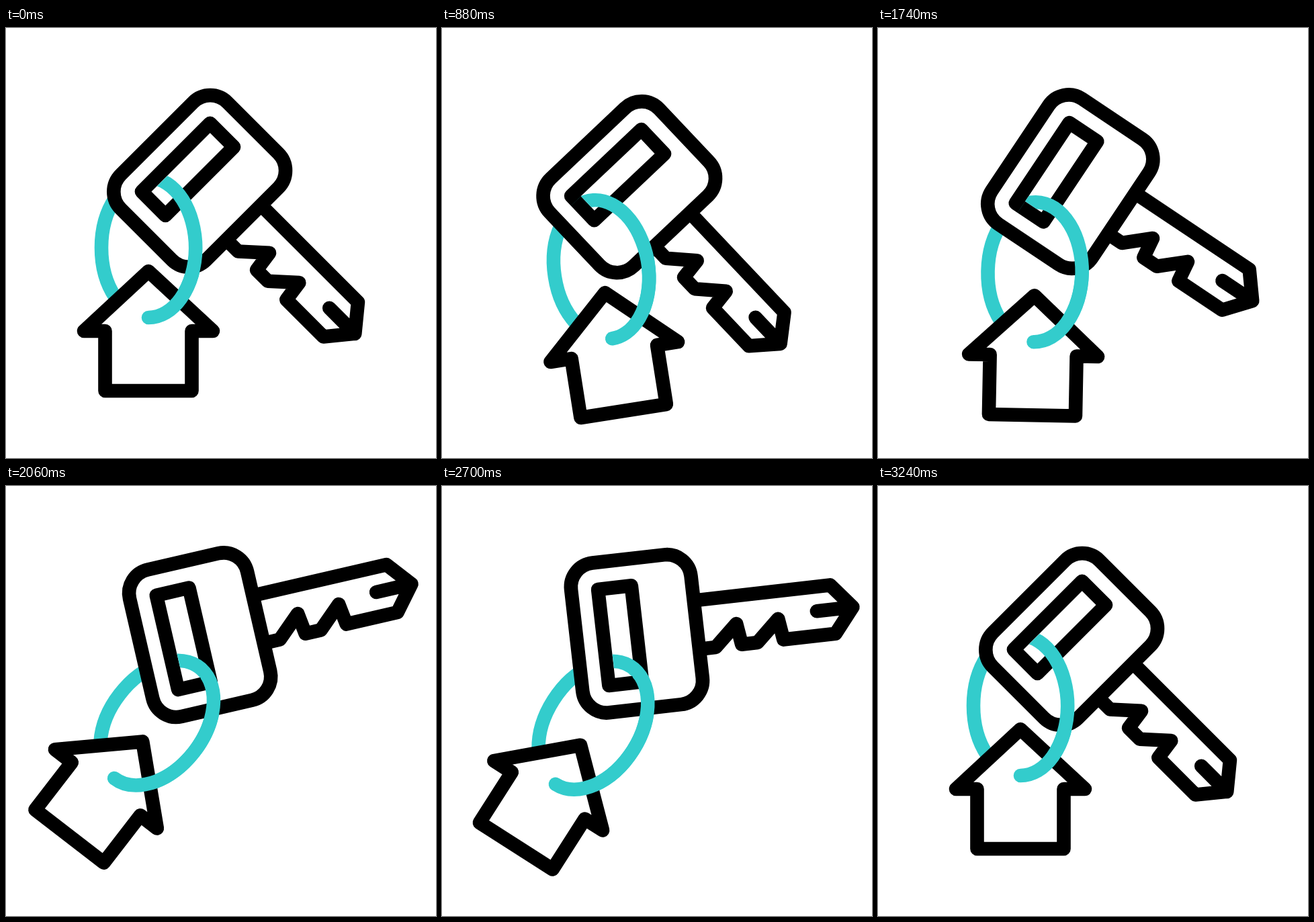
An HTML page with a canvas for the animation above (3.6 s loop, 640 by 640 pixels).

```html
<!DOCTYPE html>
<html lang="en">
<head>
<meta charset="utf-8">
<title>House key</title>
<style>
html, body { margin: 0; width: 100%; height: 100%; overflow: hidden; background: #fff; }
canvas { display: block; width: 640px; height: 640px; }
</style>
</head>
<body>
<canvas id="stage" width="640" height="640"></canvas>
<script>
const ctx = document.getElementById('stage').getContext('2d');
const LOOP = 3600, BEAT = 400, SWING_END = 7 * BEAT, REST_AT = 3240;
const TEAL = '#33cccc';

// Pivot x, pivot y and angle in degrees of the key and of the house tag
const REST = { key: [211.1, 255.6, 45], tag: [212, 232, 0] };
const UP = { key: [276.5, 304.6, -17.5], tag: [287.3, 278.4, 41.2] };
const DOWN = { key: [192, 257.2, 54.2], tag: [214.6, 264.2, -14.9] };

const ease = p => p * p * (3 - 2 * p);

function blend(a, b, p) {
  const mix = part => a[part].map((v, i) => v + (b[part][i] - v) * ease(p));
  return { key: mix('key'), tag: mix('tag') };
}

function poseAt(t) {
  if (t < BEAT) return blend(REST, UP, t / BEAT);
  if (t > SWING_END) return blend(UP, REST, Math.min(1, (t - SWING_END) / (REST_AT - SWING_END)));
  // The first fall starts after a short pause; then one swing per beat
  if (t < 800) return blend(UP, DOWN, Math.max(0, (t - 500) / 300));
  return blend(UP, DOWN, Math.abs(t / BEAT % 2 - 1));
}

function place([x, y, deg], ox, oy) {
  ctx.setTransform(1, 0, 0, 1, x, y);
  ctx.rotate(deg * Math.PI / 180);
  ctx.translate(ox, oy);
}

function shape(build) {
  ctx.beginPath();
  build();
  ctx.fill();
  ctx.stroke();
}

function shaft() {
  const mid = -3, half = 36.4, tip = 323.8, shoulder = 294, low = mid + half;
  ctx.moveTo(80, low);
  for (const x of [114.4, 177]) {
    ctx.lineTo(x, low);
    ctx.lineTo(x + 34.5, 2);
    ctx.lineTo(x + 39, low);
  }
  ctx.lineTo(shoulder, low);
  ctx.lineTo(tip, mid);
  ctx.lineTo(shoulder, mid - half);
  ctx.lineTo(80, mid - half);
  ctx.closePath();
  ctx.moveTo(270, mid);
  ctx.lineTo(tip, mid);
}

function house() {
  const wall = 64.5, eave = 96, roof = 89, base = 178;
  ctx.moveTo(0, 0);
  ctx.lineTo(eave, roof);
  ctx.lineTo(wall, roof);
  ctx.lineTo(wall, base);
  ctx.lineTo(-wall, base);
  ctx.lineTo(-wall, roof);
  ctx.lineTo(-eave, roof);
  ctx.closePath();
}

function ring(from, to) {
  ctx.strokeStyle = TEAL;
  ctx.beginPath();
  ctx.ellipse(0, -35, 70, 104, 0, from, to);
  ctx.stroke();
  ctx.strokeStyle = '#000';
}

function draw(t) {
  const { key, tag } = poseAt(t);
  const onKey = () => place(key, 35, -74);
  const onTag = () => place(tag, 0, 130);

  ctx.resetTransform();
  ctx.fillStyle = '#fff';
  ctx.fillRect(0, 0, 640, 640);
  ctx.lineWidth = 20.6;
  ctx.lineCap = ctx.lineJoin = 'round';

  onTag();
  ring(0, 2 * Math.PI);

  onKey();
  shape(shaft);
  shape(() => ctx.roundRect(-89.8, -112.1, 179.6, 224.2, 36));
  shape(() => ctx.rect(-50, -72, 50, 144));

  onTag();
  shape(house);

  // Front of the ring, hidden where it passes behind the slot's lower left corner
  ctx.save();
  onKey();
  ctx.beginPath();
  ctx.rect(-999, -999, 1998, 1998);
  ctx.rect(-150, -150, 110.4, 245);
  ctx.rect(-39.6, 61.7, 26, 28);
  ctx.clip('evenodd');
  onTag();
  ring(-1.95 - 0.007 * tag[2], Math.PI / 2);
  ctx.restore();
}

function tick() {
  draw(performance.now() % LOOP);
  requestAnimationFrame(tick);
}
tick();
</script>
</body>
</html>
```
